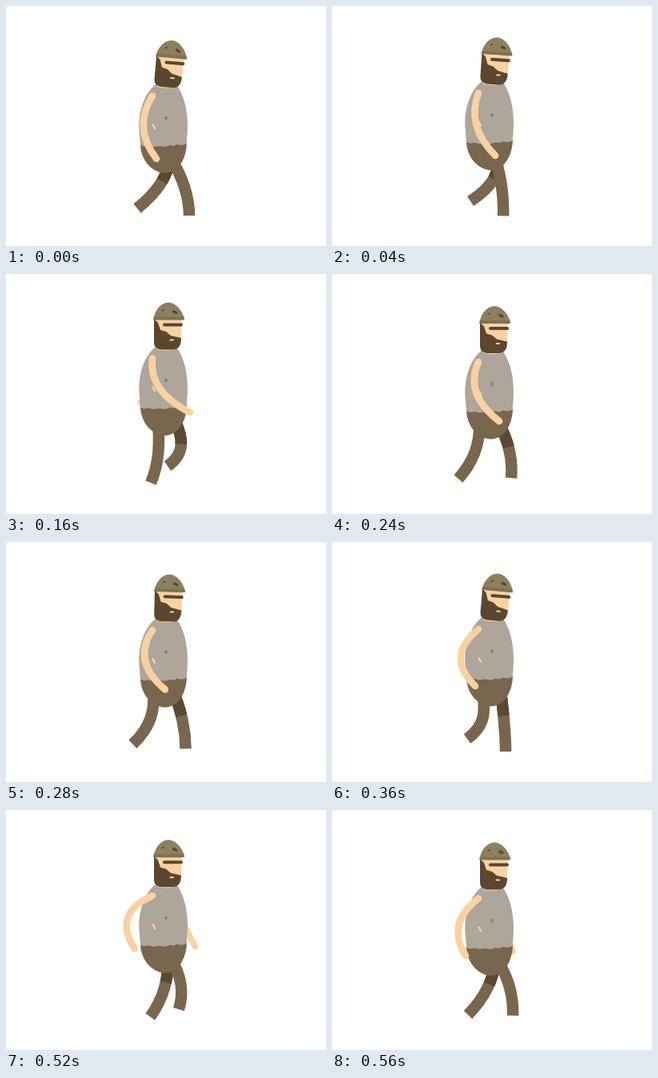
Recreate the animation shown at these times as an HTML page with a canvas. Size 400x300 px, loop 640 ms.

```html
<!DOCTYPE html>
<html lang="en">
<head>
<meta charset="utf-8">
<title>Walk cycle</title>
<style>
  html, body { margin: 0; width: 100%; height: 100%; overflow: hidden; background: #fff; }
  canvas { display: block; width: 400px; height: 300px; }
</style>
</head>
<body>
<canvas id="stage" width="400" height="300"></canvas>
<script>
const ctx = document.getElementById('stage').getContext('2d');
const LOOP = 640, STEP = 40, LAST = 560;
const SKIN = '#f8d2a0', HAIR = '#5b4730', PANTS = '#79664e', SHADE = '#594934',
      SHIRT = '#aea59b', HAT = '#8b8161', BRIM = '#7d7252';

// Key poses, one row per time
const times = [0, 80, 160, 240, 360, 440, 480, 560];

// body height, head tilt in degrees
const torso = [[0, 5], [-7.5, 2], [-7, 0], [-2.5, 0], [-3.5, 5], [-9, 3], [-8.5, 1], [-2, 0]];

// hip x, thigh x, shin x, foot x, foot y
const nearLeg = [
  [206, 220, 229, 229, 262], [198, 202, 199, 197, 262],
  [190, 192, 192, 181, 261], [184, 185, 178, 158, 256],
  [188, 192, 192, 169, 246], [197, 206, 206, 189, 239],
  [203, 218, 215, 203, 241], [207, 222, 227, 226, 257]];
const farLeg = [
  [205, 202, 190, 164, 253], [206, 223, 205, 185, 236],
  [211, 224, 221, 202, 240], [209, 222, 226, 224, 255],
  [211, 214, 217, 217, 262], [208, 208, 204, 200, 262],
  [203, 204, 204, 192, 261], [204, 202, 192, 170, 256]];

// elbow x, y, hand x, y
const nearArm = [
  [158, 152, 188, 191], [175, 147, 219, 181], [178, 147, 230, 173], [165, 150, 209, 184],
  [141, 143, 179, 180], [131, 117, 159, 166], [126, 117, 157, 165], [142, 142, 167, 182]];

// hand x, y
const farArm = [
  [208, 178], [180, 160], [168, 161], [178, 165], [214, 165], [236, 167], [244, 164], [226, 177]];

// Smooth cyclic interpolation between key poses
function pose(rows, t) {
  const n = times.length;
  const at = i => times[(i + n) % n] + LOOP * Math.floor(i / n);
  const row = i => rows[(i + n) % n];
  let i = n - 1;
  while (times[i] > t) i--;
  const span = at(i + 1) - at(i), u = (t - at(i)) / span;
  return row(i).map((a, k) => {
    const b = row(i + 1)[k];
    const ma = (b - row(i - 1)[k]) / (at(i + 1) - at(i - 1)) * span;
    const mb = (row(i + 2)[k] - a) / (at(i + 2) - at(i)) * span;
    const d = b - a;
    return a + u * (ma + u * (3 * d - 2 * ma - mb + u * (ma + mb - 2 * d)));
  });
}

function fill(d, color) {
  ctx.fillStyle = color;
  ctx.fill(new Path2D(d));
}

function stroke(d, color, width, cap = 'round') {
  ctx.strokeStyle = color;
  ctx.lineWidth = width;
  ctx.lineCap = cap;
  ctx.stroke(new Path2D(d));
}

function leg([hip, thigh, shin, x, y], dy, shaded) {
  const d = `M${hip} ${190 + dy} C${thigh} ${213 + dy / 2} ${shin} ${226 + (y - 238) * 0.4} ${x} ${y}`;
  stroke(d, PANTS, 14.5, 'butt');
  if (!shaded) return;
  ctx.setLineDash([31, 999]);
  stroke(d, SHADE, 14.5, 'butt');
  ctx.setLineDash([]);
}

function body() {
  fill('M168 172 C168 194 184 209 199 209 C214 208 225 194 226 171 Z', PANTS);
  fill('M187 98 C172 110 165 134 166.5 156 L168 174 L173 175.5 L178 174.5 L184 176 L191 175' +
       ' L199 176 L205 174 L209 175 L214 173 L219 174 L225.5 172.5 C229 146 227 118 213 98 Z', SHIRT);
  fill('M200 137 L202.5 140 L200 143 L197.5 140 Z', '#858371');
  stroke('M183.5 148.5 L186 153', SKIN, 2.4);
  stroke('M190 100 Q201 103 211 100', SKIN, 2.5);
}

function head(tilt) {
  ctx.save();
  ctx.translate(200, 98);
  ctx.rotate(tilt * Math.PI / 180);
  ctx.translate(-200, -98);
  fill('M186 60 H220 L219 90 H188 Z', SKIN);
  fill('M185 63 L190 68 L193 77 L200 79 L206 84 L219 87 C219 96 216 101 209 101.5' +
       ' L194 101.5 C187 100.5 185 97 185 92 Z', HAIR);
  stroke('M198 70.5 H219', HAIR, 4);
  stroke('M205.5 89.5 H209', SKIN, 2);
  fill('M184.5 64 C185 55 192 43 203 42.5 C214 43 222 56 223 64 Z', HAT);
  fill('M184.8 60.5 H222.3 L223 64.5 H184.3 Z', BRIM);
  stroke('M209.5 54 L213 55.5', HAIR, 3.2);
  stroke('M195.5 52.5 L197 52', HAIR, 1.8);
  ctx.restore();
}

function draw(t) {
  const [dy, tilt] = pose(torso, t);
  const [fx, fy] = pose(farArm, t);
  const [ex, ey, hx, hy] = pose(nearArm, t);

  ctx.fillStyle = '#fff';
  ctx.fillRect(0, 0, 400, 300);
  stroke(`M212 ${112 + dy} Q${(212 + fx) / 2 - 5} ${147 + dy} ${fx} ${fy}`, SKIN, 7.5);
  leg(pose(farLeg, t), dy, true);
  leg(pose(nearLeg, t), dy, false);
  ctx.save();
  ctx.translate(0, dy);
  body();
  head(tilt);
  ctx.restore();
  stroke(`M183 ${112.5 + dy} Q${ex} ${ey} ${hx} ${hy}`, SKIN, 8.6);
}

function tick() {
  const t = performance.now() % LOOP;
  draw(Math.min(LAST, Math.floor(t / STEP) * STEP));
  requestAnimationFrame(tick);
}
tick();
</script>
</body>
</html>
```
